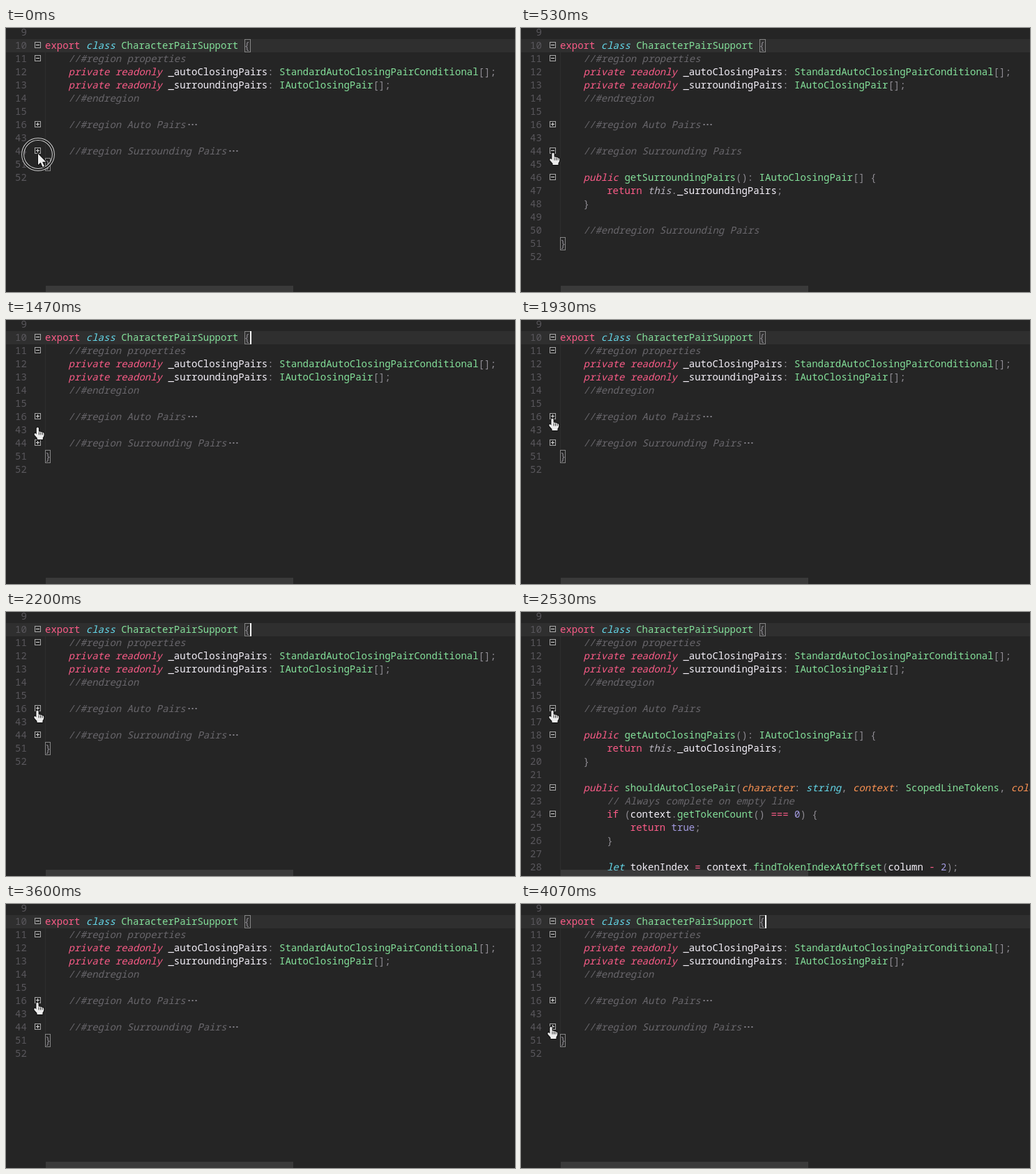
Recreate the animation shown at these times as an HTML page with a canvas. Size 730 by 380 pixels, loop 4.14 s.

```html
<!DOCTYPE html>
<html lang="en">
<head>
<meta charset="utf-8">
<title>Code folding</title>
<style>
html, body { margin: 0; width: 100%; height: 100%; overflow: hidden; background: #252525; }
canvas { display: block; }
</style>
</head>
<body>
<canvas id="stage" width="730" height="380"></canvas>
<script>
const ctx = document.getElementById('stage').getContext('2d');
const LOOP = 4140, ROW = 19, CHAR = 8.4, LEFT = 56;
const FONT = '14px "Noto Sans Mono", "DejaVu Sans Mono", monospace';

const code = {
  10: 'export class CharacterPairSupport {',
  11: '    //#region properties',
  12: '    private readonly _autoClosingPairs: StandardAutoClosingPairConditional[];',
  13: '    private readonly _surroundingPairs: IAutoClosingPair[];',
  14: '    //#endregion',
  16: '    //#region Auto Pairs',
  18: '    public getAutoClosingPairs(): IAutoClosingPair[] {',
  19: '        return this._autoClosingPairs;',
  20: '    }',
  22: '    public shouldAutoClosePair(character: string, context: ScopedLineTokens, column: number): boolean {',
  23: '        // Always complete on empty line',
  24: '        if (context.getTokenCount() === 0) {',
  25: '            return true;',
  26: '        }',
  28: '        let tokenIndex = context.findTokenIndexAtOffset(column - 2);',
  44: '    //#region Surrounding Pairs',
  46: '    public getSurroundingPairs(): IAutoClosingPair[] {',
  47: '        return this._surroundingPairs;',
  48: '    }',
  50: '    //#endregion Surrounding Pairs',
  51: '}'
};
const foldable = [10, 11, 16, 18, 22, 24, 44, 46];

// Each rule: pattern, colour, italic
const rules = [
  [/\/\/.*/, '#69676c', true],
  [/\b(?:private|readonly|public)\b/, '#fc5c88', true],
  [/\b(?:class|let|string|number|boolean)\b/, '#64d8ea', true],
  [/\b(?:export|return|if)\b|=+|-/, '#fc5c88'],
  [/\bthis\b/, '#bab6c0', true],
  [/\btrue\b|\b\d+\b/, '#a39be0'],
  [/\w+(?=: \w+[,)])/, '#fd9353', true],
  [/\b[A-Z]\w*|\w+(?=\()/, '#84e09a'],
  [/\w+/, '#f5f1fa'],
  [/[^\s\w]/, '#8f8c93']
];
const tokens = new RegExp(rules.map(r => `(${r[0].source})`).join('|'), 'g');

const arrow = new Path2D('M0 0V16L3.7 12.5L6.5 19L9 18L6.2 11.7H11.3Z');
const hand = new Path2D('M-1.6 1.2Q0 -.8 1.6 1.2V6L4 6.3L6.5 7L9 8.2Q9.6 10 9 12.5L7.5 15V17.5H-.5V15.5L-4.5 11Q-5.2 8.6 -3.2 8.6L-1.6 10Z');

function text(str, x, y, color, italic) {
  ctx.font = (italic ? 'italic ' : '') + FONT;
  ctx.fillStyle = color;
  ctx.fillText(str, x, y + 5);
}

function rect(x, y, w, h, color) {
  ctx.fillStyle = color;
  ctx.fillRect(x, y, w, h);
}

function frame(x, y, w, h, color) {
  ctx.lineWidth = 1;
  ctx.strokeStyle = color;
  ctx.strokeRect(x + .5, y + .5, w - 1, h - 1);
}

function drawLine(n, y, folded) {
  if (n === 10) rect(0, y - 9, 730, ROW, '#2f2f2f');
  text(String(n).padStart(2), 13, y, '#59575c');
  if (n > 10 && n < 51) rect(LEFT, y - 9, 1, ROW, '#2e2e2e');

  const line = code[n] || '';
  for (const m of line.matchAll(tokens)) {
    const [, color, italic] = rules[m.slice(1).findIndex(g => g !== undefined)];
    text(m[0], LEFT + m.index * CHAR, y, color, italic);
  }

  if (n === 10) frame(342, y - 9, 9, ROW, '#858585');
  if (n === 51) frame(56, y - 9, 8, ROW, '#858585');

  if (foldable.includes(n)) {
    frame(41, y - 5, 9, 9, '#a8a8a8');
    rect(43, y - 1, 5, 1, '#d8d8d8');
    if (folded) rect(45, y - 3, 1, 5, '#d8d8d8');
  }
  if (folded) {
    const end = LEFT + line.length * CHAR;
    for (let i = 0; i < 3; i++) rect(end + 4 + i * 5, y - 1, 2, 2, '#85828a');
  }
}

function ease(t, from, to) {
  const k = Math.min(1, Math.max(0, (t - from) / (to - from)));
  return k * k * (3 - 2 * k);
}

function drawPointer(t) {
  const up = ease(t, 1270, 1600), back = ease(t, 3670, 3950);
  const isArrow = t < 130;
  ctx.save();
  ctx.translate(46 - up - 2 * back, isArrow ? 181 : 179.5 - 38 * up + 35 * back);

  const radius = 23 * (1 - t / 200);
  if (radius > 2) {
    ctx.beginPath();
    ctx.arc(0, 1, radius - 1, 0, 7);
    ctx.lineWidth = 4;
    ctx.strokeStyle = '#d0d0d0';
    ctx.stroke();
    ctx.lineWidth = 2;
    ctx.strokeStyle = '#1c1c1c';
    ctx.stroke();
  }

  const shape = isArrow ? arrow : hand;
  ctx.lineWidth = 2;
  ctx.lineJoin = 'round';
  ctx.strokeStyle = '#0c0c0c';
  ctx.stroke(shape);
  ctx.fillStyle = '#ececec';
  ctx.fill(shape);
  if (!isArrow) for (const x of [1.5, 4, 6.5]) rect(x, 7, 1, 4, '#333');
  ctx.restore();
}

function draw(t) {
  const folds = {
    16: t < 2270 || t >= 3470,
    44: t < 270 || t >= 800
  };
  rect(0, 0, 730, 380, '#252525');

  let y = 6;
  for (let n = 9; n <= 52 && y < 390; n++) {
    if (folds[16] && n > 16 && n < 43) continue;
    if (folds[44] && n > 44 && n < 51) continue;
    drawLine(n, y, folds[n]);
    y += ROW;
  }

  if (t >= 20 && (t - 20) % 1000 < 500) rect(350, 16, 2, ROW, '#f5f5f5');
  rect(57, 371, 355, 9, 'rgba(120,120,120,.25)');
  drawPointer(t);
}

const start = performance.now();
function tick() {
  draw((performance.now() - start) % LOOP);
  requestAnimationFrame(tick);
}
tick();
</script>
</body>
</html>
```
